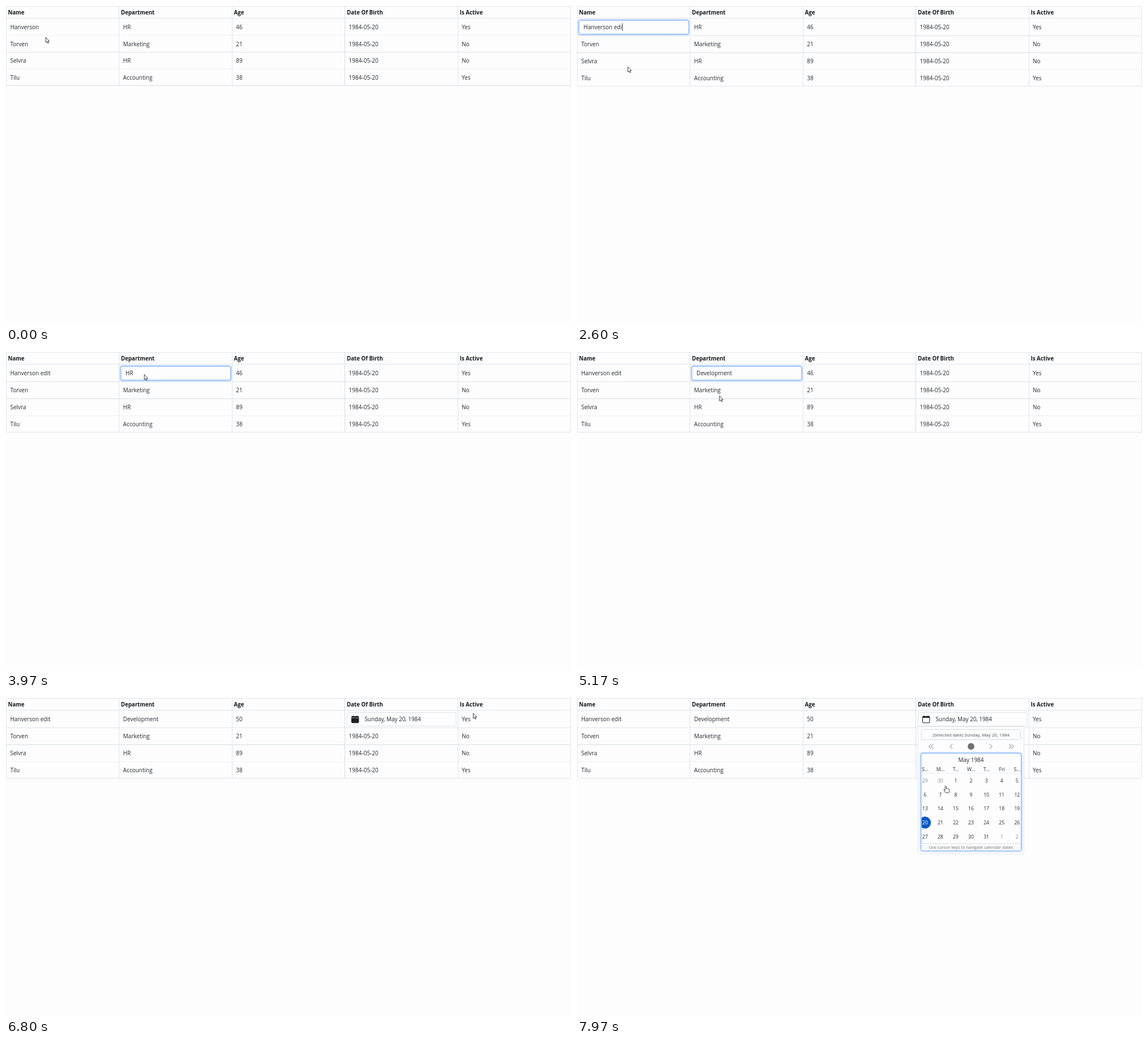
An HTML page with a canvas for the animation above (8 s loop, 998x561 px).

```html
<!DOCTYPE html>
<html lang="en">
<head>
<meta charset="utf-8">
<title>Inline table editing</title>
<style>
  html, body { margin: 0; width: 100%; height: 100%; overflow: hidden; background: #fdfdfe; }
  canvas { display: block; width: 998px; height: 561px; }
</style>
</head>
<body>
<canvas id="stage"></canvas>
<script>
const W = 998, H = 561, LOOP = 8000, COL = 199.5;
const FONT = '"Open Sans", "Noto Sans", sans-serif';
const INK = '#25292d', MUTED = '#73787d', PAPER = '#fdfdfe';

const canvas = document.getElementById('stage');
const ctx = canvas.getContext('2d');
const dpr = window.devicePixelRatio || 1;
canvas.width = Math.round(W * dpr);
canvas.height = Math.round(H * dpr);

const HEADERS = ['Name', 'Department', 'Age', 'Date Of Birth', 'Is Active'];
const BIRTH = '1984-05-20';
const ROWS = [
  ['Hanverson', 'HR', '46', BIRTH, 'Yes'],
  ['Torven', 'Marketing', '21', BIRTH, 'No'],
  ['Selvra', 'HR', '89', BIRTH, 'No'],
  ['Tilu', 'Accounting', '38', BIRTH, 'Yes']
];

// Moments at which each column of the first row enters edit mode
const EDIT = { name: 560, dept: 3680, age: 5480, date: 6200, popup: 7480 };
const SUFFIX = ' edit';
const KEY_TIMES = [1930, 2140, 2330, 2520, 2690];
const PICK_TIME = 5030;

// Pointer path: time, x, y
const PATH = [
  [0, 70, 55], [180, 70, 55], [480, 76, 39], [700, 76, 39], [1150, 84, 87.5],
  [1800, 84, 87.5], [2300, 89.5, 107], [2950, 89.5, 107], [3600, 244, 39.5],
  [4150, 244, 39.5], [4800, 251.5, 77], [5180, 251.5, 77], [5430, 442, 40],
  [5880, 442, 40], [6150, 660, 40], [6280, 660, 40], [6740, 825, 26.5],
  [6860, 825, 26.5], [7300, 617, 39], [7560, 617, 39], [7940, 651, 155], [LOOP, 651, 155]
];

function pointerAt(t) {
  let i = 1;
  while (i < PATH.length - 1 && PATH[i][0] < t) i++;
  const [t0, x0, y0] = PATH[i - 1], [t1, x1, y1] = PATH[i];
  const p = Math.max(0, Math.min(1, (t - t0) / (t1 - t0)));
  const e = p * p * (3 - 2 * p);
  return [x0 + (x1 - x0) * e, y0 + (y1 - y0) * e];
}

// y is the middle of a line of text
function text(str, x, y, size = 10, color = INK, align = 'left', weight = 400) {
  ctx.font = `${weight} ${size}px ${FONT}`;
  ctx.textAlign = align;
  ctx.textBaseline = 'alphabetic';
  ctx.fillStyle = color;
  ctx.fillText(str, x, y + size * 0.36);
}

function fill(x, y, w, h, color) {
  ctx.fillStyle = color;
  ctx.fillRect(x, y, w, h);
}

function box(x, y, w, h, r, fillColor, strokeColor, lineWidth = 1) {
  ctx.beginPath();
  ctx.roundRect(x, y, w, h, r);
  if (fillColor) {
    ctx.fillStyle = fillColor;
    ctx.fill();
  }
  if (strokeColor) {
    ctx.strokeStyle = strokeColor;
    ctx.lineWidth = lineWidth;
    ctx.stroke();
  }
}

function line(points, color, width = 1) {
  ctx.beginPath();
  points.forEach(([x, y], i) => i ? ctx.lineTo(x, y) : ctx.moveTo(x, y));
  ctx.strokeStyle = color;
  ctx.lineWidth = width;
  ctx.stroke();
}

function focusBox(x, y, w, h) {
  box(x - 1.2, y - 1.2, w + 2.4, h + 2.4, 4, null, '#c2dbfe', 2.6);
  box(x, y, w, h, 3, PAPER, '#86b7fe', 1);
}

function firstRow(t) {
  const row = ROWS[0].slice();
  row[0] += SUFFIX.slice(0, KEY_TIMES.filter(k => t >= k).length);
  if (t >= PICK_TIME) row[1] = 'Development';
  if (t >= 5780) row[2] = '50';
  else if (t >= 5660) row[2] = '5';
  return row;
}

function activeColumn(t) {
  return [EDIT.name, EDIT.dept, EDIT.age, EDIT.date].filter(s => t >= s).length - 1;
}

function drawGrid(editing) {
  const strong = '#d9dce0', medium = '#e1e4e8', faint = '#f0f1f3';
  const lines = editing
    ? [[0, medium], [21, medium], [52, medium], [82, strong], [112, faint], [141, medium]]
    : [[0, medium], [21, medium], [51, faint], [81, medium], [110, faint], [140, strong]];
  const bottom = editing ? 142 : 141;
  lines.forEach(([y, c]) => fill(0, y, W, 1, c));
  [0, 199, 399, 598, 798, 997].forEach((x, i) =>
    fill(x, 0, 1, bottom, i === 3 ? strong : medium));
}

function drawTable(t) {
  const active = activeColumn(t), editing = active >= 0;
  const top = 37.5, pitch = editing ? 30 : 29.6;
  drawGrid(editing);
  HEADERS.forEach((h, c) => text(h, 3.5 + c * COL, 11.6, 9.7, '#16191c', 'left', 700));
  ROWS.forEach((source, r) => {
    const row = r ? source : firstRow(t);
    row.forEach((value, c) => {
      if (r || c !== active) text(value, 7.4 + c * COL - c * 0.1, top + r * pitch);
    });
  });
  if (active === 3) drawDateField(t);
  else if (editing) drawField(active, firstRow(t)[active], t);
}

function drawField(col, value, t) {
  const x = col * COL;
  focusBox(x + 3.5, 25.5, 193.5, 24);
  text(value, x + 11.6, 37.5);
  if (col === 1) return;
  const lastKey = Math.max(EDIT.name, ...KEY_TIMES.filter(k => k <= t));
  const since = t - (col === 0 ? lastKey : EDIT.age);
  if (since % 1060 < 800) {
    fill(x + 12.2 + ctx.measureText(value).width, 30.5, 0.9, 13.5, INK);
  }
}

function drawDateField(t) {
  const open = t >= EDIT.popup;
  box(602.5, 25.5, 192.5, 24, 3, PAPER, '#dfe2e6');
  box(610.5, 32.5, 12.4, 11.2, 1.5, open ? PAPER : '#1b2025', '#1b2025', 1.1);
  fill(612.7, 31, 1.3, 2, '#1b2025');
  fill(619.4, 31, 1.3, 2, '#1b2025');
  if (open) fill(610.5, 32.5, 12.4, 2.4, '#1b2025');
  else fill(610, 34.6, 13.4, 0.8, '#b9bbbd');
  text('Sunday, May 20, 1984', 633.4, 37.5, 9.9);
  if (open) drawCalendar();
}

function chevron(x, dir) {
  line([[x - dir * 2, 81.5], [x + dir * 2, 85.5], [x - dir * 2, 89.5]], '#6b7075', 1);
}

function drawCalendar() {
  box(602.5, 50.5, 187, 224.5, 2, PAPER, '#e3e5e8');
  box(608.5, 55.5, 175, 18, 2, PAPER, '#d5d9dd');
  text('(Selected date) Sunday, May 20, 1984', 696, 64.7, 7.9, '#495057', 'center');

  [[623.3, -1], [627.3, -1], [661, -1], [731, 1], [765, 1], [769, 1]]
    .forEach(([x, dir]) => chevron(x, dir));
  ctx.beginPath();
  ctx.arc(696, 85.4, 5.8, 0, Math.PI * 2);
  ctx.fillStyle = '#6f7275';
  ctx.fill();

  focusBox(608, 97.8, 176.5, 171.4);
  ctx.save();
  ctx.beginPath();
  ctx.rect(608.7, 98.3, 175.2, 170.4);
  ctx.clip();
  text('May 1984', 696, 109.3, 10, INK, 'center');
  ['S...', 'M...', 'T...', 'W...', 'T...', 'Fri', 'S...'].forEach((day, i) =>
    text(day, 615 + i * 27.1, 126, 8.6, INK, 'center'));
  fill(608, 132, 177, 1, '#eaecef');
  for (let i = 0; i < 35; i++) {
    const x = 614.7 + (i % 7) * 27.1, y = 145.9 + Math.floor(i / 7) * 24.65;
    const day = (i + 28) % 30 + 1;
    const inMonth = i >= 2 && i < 33;
    const label = inMonth ? i - 1 : i < 2 ? day : i - 32;
    if (inMonth && label === 20) {
      ctx.beginPath();
      ctx.arc(x, y, 10.5, 0, Math.PI * 2);
      ctx.fillStyle = '#0b58c5';
      ctx.fill();
    }
    const color = !inMonth ? '#85898d' : label === 20 ? '#fff' : INK;
    text(String(label), x, y, 8.6, color, 'center');
  }
  fill(608, 256.5, 177, 13, '#f7f8f9');
  fill(608, 256, 177, 1, '#e1e4e7');
  text('Use cursor keys to navigate calendar dates', 696, 263.2, 7.5, MUTED, 'center');
  ctx.restore();
}

const ARROW = new Path2D('M0 0V9.3L2.1 7.4L3.5 10.6L5 10L3.6 6.8H6.3Z');
const HAND = new Path2D('M-1.1 .8Q0 -.8 1.1 .8V4.6L2.2 4.4Q3 4.3 3.2 5L4.4 4.9Q5.2 5 5.3 5.7' +
  'Q6.7 5.7 6.6 7V9L5.4 11.8H-.2L-3.2 7.8Q-3.6 6.2 -2.2 6.6L-1.1 7.6Z');

function drawPointer(t) {
  const [x, y] = pointerAt(t);
  ctx.save();
  ctx.translate(x + 0.3, y + 0.2);
  ctx.lineJoin = 'round';
  ctx.lineWidth = 0.9;
  ctx.fillStyle = '#fff';
  ctx.strokeStyle = '#2c2c30';
  const shape = t >= 7290 ? HAND : ARROW;
  ctx.fill(shape);
  ctx.stroke(shape);
  ctx.restore();
}

const start = performance.now();

function draw() {
  const t = (performance.now() - start) % LOOP;
  ctx.setTransform(dpr, 0, 0, dpr, 0, 0);
  fill(0, 0, W, H, PAPER);
  drawTable(t);
  drawPointer(t);
  requestAnimationFrame(draw);
}

draw();
</script>
</body>
</html>
```
